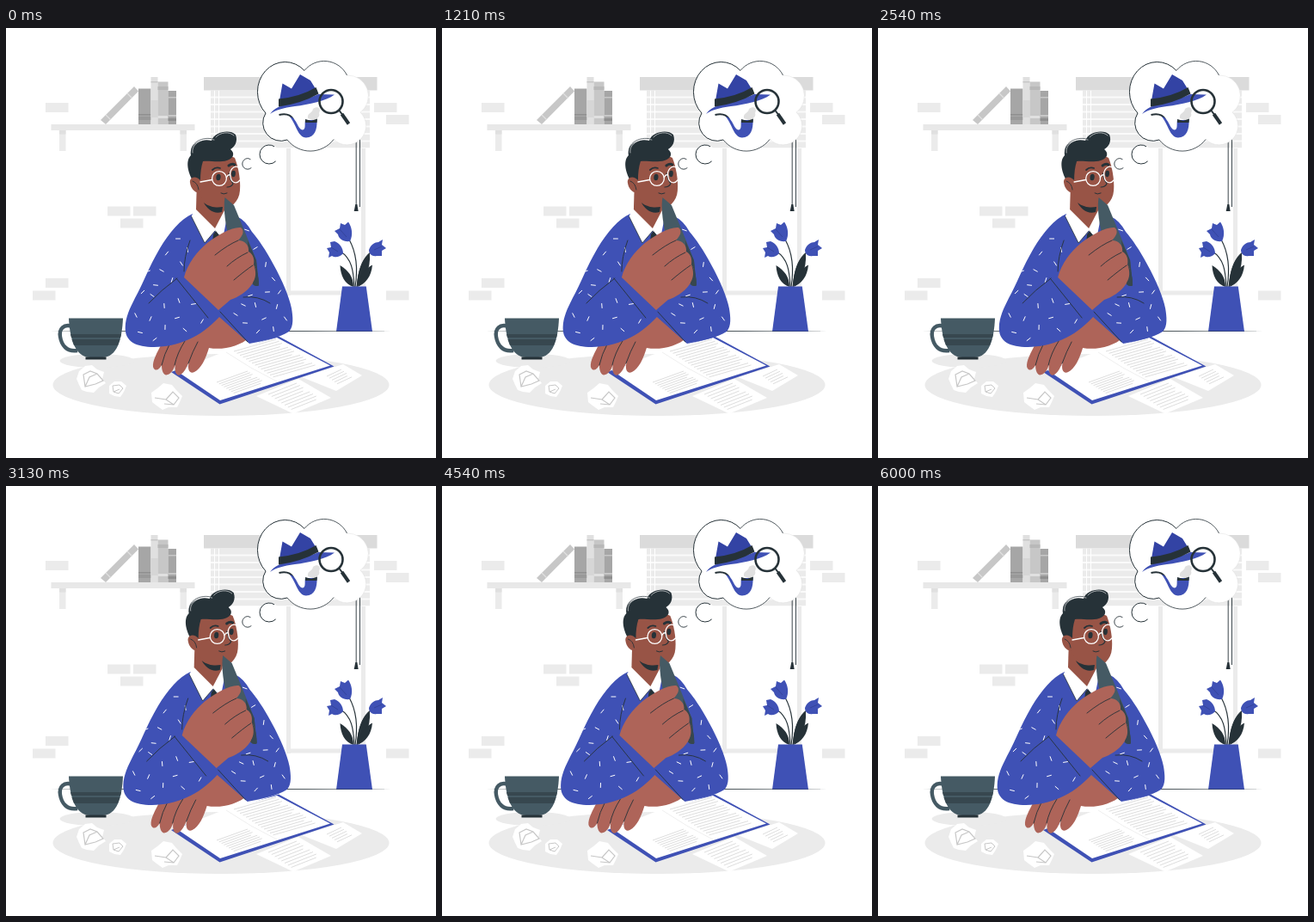
Write an HTML page with a canvas that moves like this. It is 500 by 500 pixels and loops after 6040 ms.

```html
<!DOCTYPE html>
<html lang="en">
<head>
<meta charset="utf-8">
<title>Thinking it over</title>
<style>
html, body { margin: 0; width: 100%; height: 100%; overflow: hidden; background: #fff; }
canvas { display: block; width: 500px; height: 500px; }
</style>
</head>
<body>
<canvas id="stage"></canvas>
<script>
const canvas = document.getElementById('stage');
const dpr = window.devicePixelRatio || 1;
canvas.width = canvas.height = 500 * dpr;
let ctx = canvas.getContext('2d');

const BLUE = '#3f51b5', NAVY = '#3343a4', DARK = '#263238', SLATE = '#455a64', SLATE2 = '#37474f';
const SKIN = '#ae6459', FACE = '#985446', PALE = '#ebebeb', GREY = '#e0e0e0', MID = '#c7c7c7', DEEP = '#a6a6a6';

function fill(d, color) {
  ctx.fillStyle = color;
  ctx.fill(new Path2D(d));
}
function line(d, color = DARK, width = 1) {
  ctx.strokeStyle = color;
  ctx.lineWidth = width;
  ctx.stroke(new Path2D(d));
}
function rect(x, y, w, h, color) {
  ctx.fillStyle = color;
  ctx.fillRect(x, y, w, h);
}
function oval(x, y, rx, ry, color, tilt = 0) {
  ctx.beginPath();
  ctx.ellipse(x, y, rx, ry, tilt, 0, Math.PI * 2);
  ctx.fillStyle = color;
  ctx.fill();
}
function ring(x, y, r, color, width, from = 0, to = Math.PI * 2) {
  ctx.beginPath();
  ctx.arc(x, y, r, from, to);
  ctx.strokeStyle = color;
  ctx.lineWidth = width;
  ctx.stroke();
}
// Ruled text: n rows, the ends of each row step along (sx, sy)
function rows(n, x1, y1, x2, y2, sx, sy) {
  for (let i = 0; i < n; i++) {
    const cut = i % 4 === 3 ? 0.12 : 0;
    const ex = x2 - (x2 - x1) * cut, ey = y2 - (y2 - y1) * cut;
    line(`M${x1 + sx * i},${y1 + sy * i}L${ex + sx * i},${ey + sy * i}`, '#cfcfcf', 0.7);
  }
}

function wall() {
  for (const [x, y] of [[46, 87], [428, 87], [442, 101], [118, 207.5], [148, 207.5], [133, 221.5], [46, 291], [31, 305.5], [442, 305.5]])
    rect(x, y, 26.5, 11, PALE);
}

function shelf() {
  rect(62, 118, 7.5, 25, PALE);
  rect(202.5, 118, 7.5, 25, PALE);
  rect(62, 118.5, 7.5, 5, GREY);
  rect(202.5, 118.5, 7.5, 5, GREY);
  rect(52.5, 112, 167, 7, '#e8e8e8');
  fill('M110,107L149,68L154,73.5L116,112Z', MID);
  line('M116,101L121.5,106.5M141,76L146.5,81.5', GREY, 1.2);
  rect(154, 70.5, 14.5, 41.5, DEEP);
  rect(154, 100, 14.5, 1.5, '#8f8f8f');
  rect(154, 103, 14.5, 4, '#999');
  rect(168.5, 57, 8, 55, GREY);
  rect(168.5, 62, 8, 1.5, MID);
  rect(168.5, 84, 8, 20, '#d6d6d6');
  rect(176.5, 62.5, 12, 49.5, MID);
  rect(176.5, 68, 12, 4, '#b8b8b8');
  rect(176.5, 102, 12, 3, GREY);
  rect(188.5, 73, 9.5, 39, DEEP);
  rect(188.5, 80, 9.5, 1.5, MID);
  rect(188.5, 101, 9.5, 2, MID);
  rect(188.5, 105, 9.5, 3, '#8f8f8f');
}

function casement() {
  rect(326, 138, 5, 173, PALE);
  rect(326, 305.5, 92, 5, PALE);
  rect(413, 138, 5, 173, PALE);
  rect(238, 72, 185, 68, '#fafafa');
  for (let y = 73; y < 138; y += 8.5) rect(238, y, 185, 6.5, PALE);
  rect(242, 72, 1, 68, '#fff');
  rect(247, 72, 1, 68, '#fff');
  rect(230, 57, 201.5, 15.5, '#dbdbdb');
  line('M407.2,112V206M411.5,112V208', DARK, 0.9);
  fill('M406.3,205H408.3L409.7,213H404.7Z', DARK);
}

function cloud() {
  const left = 'M327,130A21,21 0 0 1 302,99A29.5,32 0 0 1 347,49.5';
  const top = 'A29.5,29.5 0 0 1 396.5,55';
  const right = 'A24,24 0 0 1 412,98A22,22 0 0 1 381,129.5';
  const bottom = 'A34,34 0 0 1 327,130';
  fill(left + top + right + bottom + 'Z', '#fff');
  line('M396.5,55' + right, '#d8d8d8', 0.4);
  line('M347,49.5' + top + 'M381,129.5' + bottom, DARK, 0.8);
  line(left, DARK, 1);
  oval(306, 147, 11.5, 11.5, '#fff');
  ring(306, 147, 11, DARK, 1, 0.8, 5.3);
  oval(281, 158, 6.5, 6.5, '#fff');
  ring(281, 158, 6.2, DARK, 0.9, 0.8, 5.3);

  // Hat
  fill('M317.5,87L321.5,64.5L332,70.5L342,54L354,61L362,74L340,86Z', NAVY);
  fill('M307,100C313,92 320,90 332,87C346,84 356,80 363,77L382,77.5C372,85 352,89 336,91C322,93 314,95 307,100Z', BLUE);
  fill('M317,82.5Q342,80 360.5,69L363.5,76.5Q343,88 317,91.5Z', DARK);
  // Pipe and smoke
  fill('M351,105C350,98 356,100 357,94C362,90 367,93 364,99C366,104 360,105 359,108Z', GREY);
  line('M317.5,101C326,99 331,101 334,106', DARK, 2);
  fill('M330,103C338,104 339,118 345,118.5C349,118 347,111 348,107L361.5,107C362,118 359,127 349,127.5C339,127 338,113 330,103Z', BLUE);
  fill('M348,106L355,108L362,105.5L361.5,110L348,110Z', DARK);
  // Magnifier
  ring(378, 85.5, 13.5, DARK, 2.6);
  line('M387.5,96L391,100.500', DARK, 2);
  line('M390.5,100L398.5,111.5', DARK, 4);
}

function plant() {
  line('M406,301C409,282 408,262 399,246', DARK, 1.2);
  line('M405,301C404,282 402,268 389,260', DARK, 1.2);
  line('M408,301C410,282 414,268 424,261', DARK, 1.2);
  fill('M404,301C394,298 389,288 388.5,276C398,282 404,289 404,301Z', DARK);
  fill('M408,301C409,282 413,270 423,262C424,280 418,293 408,301Z', DARK);
  fill('M409,301C411,288 418,280 426,275.5C425,289 418,297 409,301Z', DARK);
  fill('M400,248C392,249 387,245 386,240L382,236L388,233L389,227L394,229L398,225.500C402,231 404,240 400,248Z', BLUE);
  fill('M392,262C388,267 382,267 379,265L375,267L376,261L373,256L378,255L377,249L382,248C388,250 392,256 392,262Z', BLUE);
  fill('M422,258C424,252 429,249 433,249L438,246L437,252L442,256L437,259L437,265L431,265C426,266 422,263 422,258Z', BLUE);
  line('M388,234L396,243M378,255L386,260M437,254L428,258', '#303f91', 0.7);
  fill('M391,300.5H418.8L426,353H384Z', BLUE);
}

function desk() {
  fill('M50,352.5Q250,351.5 449,352.5Q250,353.5 50,352.5Z', DARK);
  line('M60,352.5H440', 'rgba(38,50,56,.3)', 0.5);
  oval(250, 415, 195.5, 36, PALE);
  oval(106, 387, 43.5, 8, PALE);

  // Cup
  line('M77,347C67,343.500 61.500,350 63,359C64.500,369 71,377 83,375', SLATE, 4.4);
  fill('M73,337.5H136C135,362 129,383 112,383H98C80,383 74,360 73,337.5Z', SLATE);
  fill('M75,356H134L133,360H76Z', SLATE2);
  fill('M76.5,362H132.5L130,369H79Z', SLATE2);
  rect(92.5, 382.5, 24, 3, DARK);

  // Crumpled paper
  fill('M85,399L92,393L100,392L106,397L114,400L112,408L116,413L108,418L102,424L94,423L88,421L85,415L82,408Z', '#fff');
  line('M90,403L98,399L106,402L113,410L104,414L92,417ZM92,417L97,406L106,402', MID, 1.2);
  fill('M120,416L126,411L134,411L140,416L137,423L133,429L126,428L120,425Z', '#fff');
  line('M124,416L132,415L136,419L131,425L125,423ZM125,423L132,420', MID, 1);
  fill('M169,424L176,419L183,413L193,415L198,421L205,428L202,435L199,441L189,441L182,444L175,439L170,435Z', '#fff');
  line('M173,430L186,432L195,438L201,430L194,423L186,432M195,438L184,437', MID, 1.2);

  // Loose sheets
  fill('M344,406L392,391L414,404L384,422Z', '#fff');
  rows(5, 373, 405, 390, 397, 3, 2.2);
  fill('M291,428L340,408L378,430L334,448.5Z', '#fff');
  rows(8, 305, 426, 338, 413, 3.8, 2.5);

  // Notebook
  fill('M192,400L255,378L317,358.5L381.5,393.5L248.5,437.5Z', BLUE);
  fill('M198,398.5L255,376L315,360L377,392.5L249,433Z', '#fff');
  line('M256,377Q284,396 315,411', PALE, 0.8);
  rows(14, 265, 376, 314, 362, 3.5, 2.3);
  rows(8, 245, 412, 281, 399, 2.8, 1.8);
}

function hand() {
  fill('M246,332C232,350 200,360 181,367C176,377 170,387 171,394C173,400 178,398 181,392C181,400 184,405 188,403C192,402 195,397 197,391C195,400 199,406 203,403C208,400 210,394 213,388C210,397 214,403 219,400C227,396 232,385 236,372C252,375 272,370 283,360L256,326Z', SKIN);
  line('M190,368Q184,379 181,392M208,364Q199,378 196,392M223,365Q217,376 212,390', DARK, 0.9);
}

const BODY = 'M217,216C203,222 190,238 179,256C166,278 159,298 150,314C144,326 139,336 138.7,348C138,365 152,371 172,371C200,370.5 226,360 248,336L283,367C300,364 318,360 329,353C335,347 333.5,335 332,326C329,312 322,295 311,275C302,258 293,245 286,237Q278,223 268,219Z';
// Sprinkle centres; each one's tilt follows from its index
const DOTS = [200, 245, 187, 262, 211, 258, 181, 282, 165, 283, 193, 293, 204, 274, 174, 299, 159, 307, 184, 323, 170, 311,
  199, 337, 168, 338, 151, 334, 156, 354, 173, 362, 185, 348, 208, 351, 218, 321, 228, 341, 201, 317,
  280, 235, 290, 256, 302, 275, 311, 292, 304, 307, 318, 307, 290, 322, 276, 322, 300, 338, 315, 324, 325, 338, 278, 343,
  293, 353, 311, 350, 267, 333, 284, 311];

function sweater() {
  fill(BODY, BLUE);
  ctx.save();
  ctx.clip(new Path2D(BODY));
  for (let i = 0; i < DOTS.length; i += 2) {
    const a = i * 1.13, dx = Math.cos(a) * 2.5, dy = Math.sin(a) * 2.5;
    line(`M${DOTS[i] - dx},${DOTS[i + 1] - dy}l${2 * dx},${2 * dy}`, '#fff', 1);
  }
  ctx.restore();
  line('M214,247Q207,266 207,283M198,291L235,337M199,291Q180,305 166,320M249,330L281,365M276,313Q293,311 307,320', DARK, 0.9);
}

function head() {
  // Shirt and neck
  fill('M222,207L215.5,219L231,250L243,236L252,245L257,220L253,207Z', '#fff');
  line('M215.5,219L231,250L243,236', DARK, 0.8);
  fill('M241,240L244,236L248,241L247,250H240Z', DARK);
  fill('M222,176L221,211L243,233L254,212V190Z', FACE);
  // Face
  fill('M225,154C240,148 258,146 266,151C270,161 273,176 272,189C271,202 262,210 250,210C237,210 229,204 224,190Z', FACE);
  fill('M230,203C237,209 246,209 252,208L251,214C242,217 234,211 230,203Z', DARK);
  // Hair
  fill('M218,179C212,169 208,155 215,148C213,135 227,128 239,131C242,121 260,117 267,124C270,132 266,138 261,141C267,146 264,152 257,154C247,157 237,154 229,155Q226,164 226,177Z', DARK);
  line('M217,145C215,134 230,127 242,130M244,127C249,121 260,120 265,125', '#fff', 0.6);
  line('M215.500,143C215,133 229,126 240,129', DARK, 0.7);
  // Ear
  fill('M227,178C220,170 213,174 214,180C215,188 222,194 227,190Z', FACE);
  line('M217,178Q223,180 224,188', DARK, 0.9);
  // Features
  oval(247, 173.5, 2.6, 3.8, DARK, 0.1);
  oval(264.5, 169.5, 2.4, 3.7, DARK, 0.1);
  line('M240,165Q244,161 249,163', DARK, 1.8);
  line('M259,160Q263,157 266,159', DARK, 3);
  line('M259,169Q261,177 264,181Q262,185 257,185', DARK, 1.1);
  line('M250,192Q253,194 257,192', DARK, 1);
  ring(248, 175, 8.4, '#fff', 1.3);
  line('M271,162.5C265,158 259,166 261,173C262,180 268,182 272,177M256.5,173.500Q258,170 261,171M239.5,176.5L226,179', '#fff', 1.3);
}

function fist() {
  fill('M254.5,197L265,206L279,240L291,270L294,299C290,302 286,298 283,292L258,240Q252,212 254.5,197Z', SLATE);
  fill('M281,247L291,270L294,299C290,302 286,298 283,292Z', SLATE2);
  fill('M207,290C211,274 222,260 234,250C247,240 263,231 273,232C278,236 275,242 270,247C278,247 283,253 282,260C288,263 289,270 288,275C293,281 292,291 286,298C280,307 270,313 261,316L247,328L207,290Z', SKIN);
  line('M270,247Q258,252 243,264M281,261Q268,267 257,277M287,276Q278,282 265,293', DARK, 0.9);
  fill('M288,275C292,281 295,292 293.5,300C290,300 288,298 287,296C291,290 291,283 288,275Z', SLATE2);
}

// The room never changes, so it is painted once
const room = document.createElement('canvas');
room.width = room.height = canvas.width;

function paintRoom() {
  const screen = ctx;
  ctx = room.getContext('2d');
  ctx.scale(dpr, dpr);
  rect(0, 0, 500, 500, '#fff');
  wall();
  shelf();
  casement();
  cloud();
  plant();
  desk();
  ctx = screen;
}

// Sideways shake with linear travel between ten equal stops
const STOPS = [0, -1, 2, -4, 4, -4, 4, -4, 2, -1, 0];
const LOOP = 6040, FPS = 24, STEPS = 144;

function shift(ms) {
  const step = Math.min(STEPS, Math.floor((ms + 5) * FPS / 1000));
  const p = step / STEPS * 10, i = Math.min(9, Math.floor(p));
  return STOPS[i] + (STOPS[i + 1] - STOPS[i]) * (p - i);
}

function draw(ms) {
  ctx.setTransform(1, 0, 0, 1, 0, 0);
  ctx.drawImage(room, 0, 0);
  ctx.setTransform(dpr, 0, 0, dpr, shift(ms) * dpr, 0);
  ctx.lineCap = ctx.lineJoin = 'round';
  hand();
  sweater();
  head();
  fist();
}

const start = performance.now();
function frame() {
  draw((performance.now() - start) % LOOP);
  requestAnimationFrame(frame);
}
paintRoom();
frame();
</script>
</body>
</html>
```
